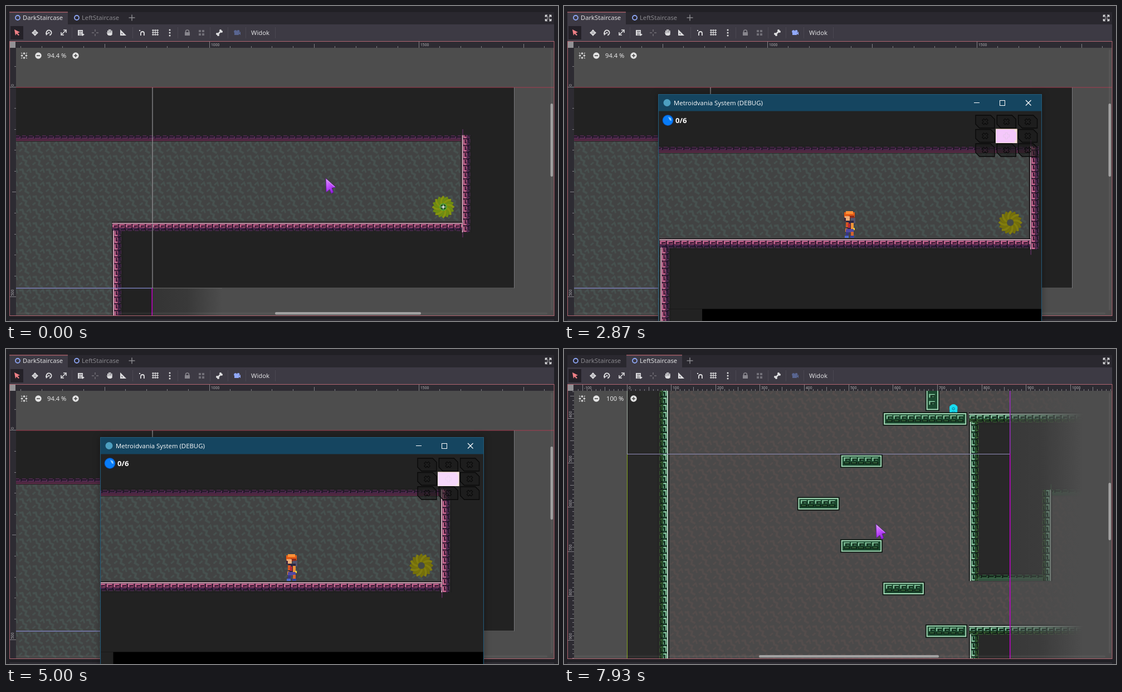
An HTML page with a canvas for the animation above (8000 ms loop, 991 px wide and 565 px high).

```html
<!DOCTYPE html>
<html lang="pl">
<head>
<meta charset="utf-8">
<title>Scene editor</title>
<style>
html, body { margin: 0; width: 100%; height: 100%; overflow: hidden; background: #212025; }
canvas { display: block; }
</style>
</head>
<body>
<canvas id="stage" width="991" height="565"></canvas>
<script>
const ctx = document.getElementById('stage').getContext('2d');
const LOOP = 8000, STEP = 200 / 3, UNIT = 0.7965;
const FONT = '"Noto Sans", "Open Sans", sans-serif';
const WIN = { x: 169, y: 158, w: 689, h: 418 };
const TAU = Math.PI * 2;

function rect(color, x, y, w, h, g = ctx) {
  g.fillStyle = color;
  g.fillRect(x, y, w, h);
}
function line(color, width, points, g = ctx) {
  g.strokeStyle = color;
  g.lineWidth = width;
  g.beginPath();
  points.forEach(([x, y], i) => i ? g.lineTo(x, y) : g.moveTo(x, y));
  g.stroke();
}
function poly(color, points) {
  ctx.fillStyle = color;
  ctx.beginPath();
  points.forEach(([x, y]) => ctx.lineTo(x, y));
  ctx.closePath();
  ctx.fill();
}
function disc(color, x, y, r) {
  ctx.fillStyle = color;
  ctx.beginPath();
  ctx.arc(x, y, r, 0, TAU);
  ctx.fill();
}
function ring(color, width, x, y, r) {
  ctx.strokeStyle = color;
  ctx.lineWidth = width;
  ctx.beginPath();
  ctx.arc(x, y, r, 0, TAU);
  ctx.stroke();
}
function text(str, x, y, size, color, weight = 400) {
  ctx.font = `${weight} ${size}px ${FONT}`;
  ctx.fillStyle = color;
  ctx.fillText(str, x, y);
}
function saved(draw) {
  ctx.save();
  draw();
  ctx.restore();
}
function clipTo(x, y, w, h) {
  ctx.beginPath();
  ctx.rect(x, y, w, h);
  ctx.clip();
}
// Linear interpolation between [time, ...values] keys.
function track(t, keys) {
  if (t <= keys[0][0]) return keys[0].slice(1);
  for (let i = 1; i < keys.length; i++) {
    const a = keys[i - 1], b = keys[i];
    if (t <= b[0]) {
      const k = (t - a[0]) / (b[0] - a[0]);
      return a.slice(1).map((v, j) => v + (b[j + 1] - v) * k);
    }
  }
  return keys[keys.length - 1].slice(1);
}
const ramp = (t, a, b) => Math.min(1, Math.max(0, (t - a) / (b - a)));

// ---- tile patterns, in world units ----
function makeTile(w, h, draw) {
  const c = document.createElement('canvas');
  c.width = w;
  c.height = h;
  draw(c.getContext('2d'));
  return { h, fill: ctx.createPattern(c, 'repeat') };
}
function stoneTile(base, blotch) {
  return makeTile(32, 32, g => {
    rect(base, 0, 0, 32, 32, g);
    for (const dx of [-32, 0, 32]) for (const dy of [-32, 0, 32]) {
      const shift = pts => pts.map(([x, y]) => [x + dx, y + dy]);
      line(blotch, 5, shift([[2, 5], [10, 4], [12, 13], [19, 16], [17, 24], [26, 29]]), g);
      line(blotch, 4, shift([[20, 9], [27, 3], [30, 12]]), g);
      line(blotch, 4, shift([[2, 25], [9, 19]]), g);
    }
  });
}
function brickTile(edge, hi, mid, lo, dark) {
  return makeTile(16, 25, g => {
    rect(dark, 0, 0, 16, 19, g);
    rect('#08080a', 0, 0, 16, 2, g);
    rect(edge, 0, 2, 16, 2.5, g);
    rect(mid, 1, 5, 14, 9, g);
    rect(hi, 1, 6, 12, 2, g);
    rect(hi, 1, 6, 2.5, 7, g);
    rect(hi, 8, 11.5, 5, 1.5, g);
    rect(dark, 5, 9, 8, 2.5, g);
    rect(lo, 0, 15, 13, 2, g);
    rect(lo, 2, 15, 2, 6, g);
    rect(lo, 6, 20, 9, 1.5, g);
    rect(dark, 8, 17, 6, 3, g);
  });
}
function dimTile(edge, lo, dark) {
  return makeTile(16, 17, g => {
    rect(dark, 0, 0, 16, 13, g);
    rect('#0a0a0c', 0, 0, 16, 1, g);
    rect(edge, 0, 1, 16, 1.4, g);
    rect(edge, 0, 4.5, 16, 1.2, g);
    rect(lo, 1, 7, 13, 1.8, g);
    rect(lo, 1, 7, 2, 5, g);
    rect(lo, 4, 12.5, 9, 1.4, g);
  });
}
const darkStone = stoneTile('#424343', '#47514f');
const leftStone = stoneTile('#4a4949', '#544d4c');
const pinkWall = brickTile('#e0b4c4', '#d4719b', '#7b3358', '#59305c', '#21152a');
const pinkDim = dimTile('#8a3c62', '#62305f', '#251a2b');
const greenWall = brickTile('#d2efdd', '#93d1ab', '#24573a', '#36602f', '#0f1f17');
const greenDim = dimTile('#66a67d', '#3a7048', '#14231a');

// Band that grows from its inner edge; the angle turns it to floor, wall or ceiling.
function wall(tile, x, y, len, quarter) {
  saved(() => {
    ctx.translate(x, y);
    ctx.rotate(quarter * Math.PI / 2);
    rect(tile.fill, 0, 0, len, tile.h);
  });
}
const FLOOR = 0, LEFT = 1, CEIL = 2, RIGHT = -1;

function portal(angle, editing) {
  saved(() => {
    ctx.translate(1558.5, 285.5);
    disc(editing ? '#66840f' : '#716d10cc', 0, 0, 23);
    ctx.rotate(angle);
    for (let i = 0; i < 16; i++) {
      ctx.rotate(TAU / 16);
      ctx.strokeStyle = i % 2 ? (editing ? '#86930f' : '#827d0d') : (editing ? '#6f8c12' : '#757009');
      ctx.lineWidth = 5;
      ctx.beginPath();
      ctx.moveTo(8, 0);
      ctx.quadraticCurveTo(18, 1, 22, 13);
      ctx.stroke();
    }
    ctx.rotate(-angle);
    disc(editing ? '#315b24' : '#454a46', 0, 0, 7.5);
    if (editing) {
      ring('#52b83e', 1.5, 0, 0, 8);
      line('#b7d8ce', 1.5, [[-6, 0], [6, 0]]);
      line('#b7d8ce', 1.5, [[0, -6], [0, 6]]);
      disc('#e6e6e6', 0, 0, 2.5);
    }
  });
}

function darkWorld(angle, editing) {
  rect('#222222', 0, 0, 1728, 480);
  rect('#222222', 0, 480, 864, 1000);
  rect(darkStone.fill, 0, 128, 1603, 194);
  rect(darkStone.fill, 0, 320, 769, 1000);
  wall(pinkDim, 1622, 129, 1622, CEIL);
  wall(pinkWall, 768, 1300, 979, RIGHT);
  wall(pinkWall, 1601, 346, 232, RIGHT);
  wall(pinkWall, 768, 321, 836, FLOOR);
  rect('#5a2e5b', 1604, 100, 2, 14);
  rect('#5a2e5b', 1604, 346, 2, 12);
  portal(angle, editing);
}

function platform(x, y, w, h) {
  rect('#07110b', x - 1, y - 1, w + 2, h + 2);
  rect('#a5dcb9', x + 1, y + 1, w - 2, h - 2);
  rect('#1c4a30', x + 3.5, y + 3.5, w - 7, h - 7);
  const tall = h > w, count = Math.floor((Math.max(w, h) - 8) / 16);
  for (let i = 0; i < count; i++) {
    const bx = x + 7 + (tall ? 0 : i * 16), by = y + 6 + (tall ? i * 16 : 0);
    rect('#8bcaa3', bx, by, 13, 2);
    rect('#8bcaa3', bx, by, 2.5, 8);
    rect('#0f2216', bx + 4, by + 3, 9, 5);
    rect('#4c8f67', bx + 6, by + 5, 6, 2);
    if (!tall) {
      rect('#0f2216', bx, by + 10, 14, 5);
      rect('#39703f', bx + 2, by + 11, 9, 2);
    }
  }
}

function pipe(x, y, r) {
  for (const [color, width] of [['#a83006', 9], ['#e63c02', 6.5]]) {
    ctx.strokeStyle = color;
    ctx.lineWidth = width;
    ctx.beginPath();
    ctx.moveTo(x, 98);
    ctx.arcTo(x, y, x + 60, y, r);
    ctx.lineTo(1050, y);
    ctx.stroke();
  }
}

function leftWorld() {
  const dark = '#282828', end = 1060;
  rect(dark, 0, 0, end, 1400);
  rect(leftStone.fill, 95, 97, end - 95, 1300);
  rect(dark, 674, 0, 284, 286);
  rect(dark, 958, 0, 110, 127);
  rect(dark, 771, 387, 187, 379);
  rect(dark, 958, 387, 110, 187);
  rect(dark, 771, 865, 300, 500);
  pipe(629, 324, 16);
  pipe(653, 302, 4);

  wall(greenDim, 695, 97, 620, CEIL);
  wall(greenWall, 95, 80, 1300, LEFT);
  wall(greenWall, 673, 286, 206, RIGHT);
  wall(greenDim, 958, 286, 284, CEIL);
  wall(greenWall, 958, 115, 171, LEFT);
  wall(greenDim, end, 127, 122, CEIL);
  wall(greenDim, 958, 766, 187, CEIL);
  wall(greenWall, 958, 560, 206, LEFT);
  wall(greenDim, end, 574, 102, CEIL);
  wall(greenWall, 771, 766, 379, RIGHT);
  wall(greenWall, 771, 387, 290, FLOOR);
  wall(greenWall, 771, 1400, 535, RIGHT);
  wall(greenWall, 771, 865, 290, FLOOR);
  for (const [x, y] of [[91, 68], [677, 68], [955, 101], [955, 548]]) rect('#315638', x, y, 2, 14);

  platform(674, 291, 29, 91);
  platform(578, 387, 188, 28);
  platform(674, 865, 92, 28);
  for (const [x, y] of [[482, 482], [385, 578], [482, 673], [577, 769]]) platform(x, y, 93, 28);

  rect('#0ba8bd', 727, 372, 18, 14);
  disc('#18dcf0', 736, 377, 9);
  rect('#18dcf0', 728, 377, 16, 9);
  ring('#0b90a8', 1.5, 736, 378, 2.5);
  line('#0b90a8', 1.5, [[732, 385], [740, 385]]);

  const fog = ctx.createLinearGradient(864, 0, 1028, 0);
  fog.addColorStop(0, 'rgba(77,77,77,.46)');
  fog.addColorStop(0.4, 'rgba(77,77,77,.52)');
  fog.addColorStop(1, 'rgba(77,77,77,1)');
  rect(fog, 864, 0, 210, 1400);
}

// ---- editor ----
const ICON = '#dedee0';
function arrows(x, y, r, color, width) {
  line(color, width, [[x - r + 2, y], [x + r - 2, y]]);
  line(color, width, [[x, y - r + 2], [x, y + r - 2]]);
  for (let i = 0; i < 4; i++) saved(() => {
    ctx.translate(x, y);
    ctx.rotate(i * Math.PI / 2);
    poly(color, [[r, 0], [r - 4, -3 - width / 4], [r - 4, 3 + width / 4]]);
  });
}

function toolbar(leftTab, running) {
  rect('#212025', 0, 0, 991, 565);
  rect('#2a282f', 6, 11, 978, 22);
  rect('#3d3a44', 6, 33, 978, 31);
  const tabX = leftTab ? 112 : 6, tabW = leftTab ? 100 : 105;
  rect('#3d3a44', tabX, 11, tabW, 22);
  rect('#bd6872', tabX, 10.5, tabW, 1.2);
  [['DarkStaircase', 6, !leftTab], ['LeftStaircase', 112, leftTab]].forEach(([name, x, on]) => {
    ring('#8da5f3', 1.8, x + 15, 21, 4);
    text(name, x + 24, 25, 11.2, on ? '#e0e0e2' : '#89888d');
  });
  line('#8f8e93', 1.4, [[220.5, 21], [231.5, 21]]);
  line('#8f8e93', 1.4, [[226, 15.5], [226, 26.5]]);
  for (const sx of [-1, 1]) for (const sy of [-1, 1]) {
    const x = 973.5 + sx * 5, y = 21.5 + sy * 5;
    line(ICON, 1.6, [[x - sx * 3.5, y], [x, y], [x, y - sy * 3.5]]);
    line(ICON, 1.3, [[x, y], [x - sx * 4, y - sy * 4]]);
  }

  for (const x of [118, 227, 308, 366, 398, 430, 483]) rect('#4a4751', x, 38, 1, 20);
  rect('#242128', 8, 36, 23, 24);
  poly('#f08086', [[15, 42], [25, 47], [21, 48.5], [24, 52], [22, 53], [19, 49.5], [17, 53]]);
  arrows(52, 48, 6, ICON, 1.5);
  ctx.strokeStyle = ICON;
  ctx.lineWidth = 2;
  ctx.beginPath();
  ctx.arc(77, 48, 4.5, 2.4, 7.6);
  ctx.stroke();
  poly(ICON, [[71, 48], [76, 49], [72, 53]]);
  disc(ICON, 77, 48, 1.5);
  line(ICON, 1.6, [[99, 47], [99, 52], [104, 52]]);
  line(ICON, 1.6, [[100, 51], [107, 44]]);
  line(ICON, 1.6, [[103, 43], [108, 43], [108, 48]]);
  rect(ICON, 129, 43, 9, 10);
  for (const y of [45, 48, 51]) rect('#3d3a44', 131, y, 6, 1);
  poly(ICON, [[135, 48], [141, 51], [137, 54]]);
  for (let i = 0; i < 4; i++) {
    const a = i * Math.PI / 2, c = Math.cos(a), s = Math.sin(a);
    line('#77757c', 1.4, [[160 + 2 * c, 48 + 2 * s], [160 + 6 * c, 48 + 6 * s]]);
  }
  for (let i = 0; i < 4; i++) rect(ICON, 182 + i * 2.3, i % 3 ? 42 : 44, 1.7, 8);
  poly(ICON, [[180, 47], [183, 49], [191, 47], [189, 53], [184, 53]]);
  poly(ICON, [[205, 42], [216, 53], [205, 53]]);
  poly('#3d3a44', [[207.5, 48], [210, 50.5], [207.5, 50.5]]);
  rect(ICON, 239, 43, 2, 2);
  ctx.strokeStyle = ICON;
  ctx.lineWidth = 1.8;
  ctx.beginPath();
  ctx.arc(245, 49, 3, Math.PI, 0);
  ctx.stroke();
  for (const x of [242, 248]) rect(ICON, x - 1, 49, 1.8, 4);
  for (const d of [0, 4, 8]) {
    line(ICON, 1.2, [[264 + d, 42], [264 + d, 53]]);
    line(ICON, 1.2, [[262, 43.5 + d], [274, 43.5 + d]]);
  }
  for (const y of [43, 48, 53]) disc(ICON, 294, y, 1.5);
  rect('#88868d', 321, 47, 9, 6);
  ring('#88868d', 1.6, 325.5, 46, 3);
  for (const [x, y] of [[346, 43], [352, 43], [346, 49], [352, 49]]) rect('#716f77', x, y, 4, 4);
  line(ICON, 2.6, [[380, 51], [386, 45]]);
  for (const [x, y] of [[379, 50], [381, 52], [385, 44], [387, 46]]) disc(ICON, x, y, 2);
  const cam = running ? '#91a9fa' : '#596590';
  disc(cam, 412, 46, 2.8);
  disc(cam, 417, 45.5, 2.4);
  rect(cam, 410, 46, 8, 6);
  poly(cam, [[417, 49], [421, 46], [421, 52]]);
  text('Widok', 440, 52, 11.2, '#dedee0');
}

function rulers(ox, oy, scale, major, minor) {
  rect('#2d2b32', 7, 64, 977, 11);
  rect('#2d2b32', 7, 64, 11, 491);
  const tick = v => v % major === 0 ? 11 : v % (major / 2) === 0 ? 7 : 3;
  saved(() => {
    clipTo(18, 64, 966, 11);
    for (let v = Math.floor(-ox / scale / major) * major; ox + v * scale < 984; v += minor) {
      const x = Math.floor(ox + v * scale), h = tick(v);
      rect('#838287', x, 75 - h, 1, h);
      if (h === 11) text(String(v), x + 3, 72, 6.7, '#b5b4b8');
    }
  });
  saved(() => {
    clipTo(7, 75, 11, 480);
    for (let v = Math.floor(-oy / scale / major) * major; oy + v * scale < 580; v += minor) {
      const y = Math.floor(oy + v * scale), w = tick(v);
      rect('#838287', 18 - w, y, w, 1);
      if (w === 11) saved(() => {
        ctx.translate(14, y - 1);
        ctx.rotate(-Math.PI / 2);
        text(String(v), 0, 0, 6.7, '#b5b4b8');
      });
    }
  });
  rect('#929195', 7, 64, 10, 11);
}

function zoomBar(label) {
  const c = '#e4e4e4';
  for (let i = 0; i < 4; i++) saved(() => {
    ctx.translate(32.5, 89);
    ctx.rotate(i * Math.PI / 2);
    poly(c, [[1.8, 0], [4.5, -2.6], [4.5, 2.6]]);
    line(c, 1.3, [[4, 0], [6, 0]]);
    line(c, 1.1, [[3.6, 3.6], [5.2, 5.2]]);
  });
  disc(c, 58, 89, 5.7);
  disc(c, 125, 89, 5.7);
  rect('#444', 55, 88.3, 6, 1.5);
  rect('#444', 122, 88.3, 6, 1.5);
  rect('#444', 124.3, 86, 1.5, 6);
  text(label, label.length > 5 ? 74 : 76, 93, 11.2, '#e6e6e6');
}

function scrollbars(hx, hw, vy, vh) {
  const bar = (color, x, y, w, h) => {
    ctx.fillStyle = color;
    ctx.beginPath();
    ctx.roundRect(x, y, w, h, 2);
    ctx.fill();
  };
  bar('#ffffff0c', 18, 549.5, 954, 3.5);
  bar('#ffffff0c', 978, 78, 3.5, 468);
  bar('#a1a1a1', hx, 549, hw, 4.5);
  bar('#a1a1a1', 977.5, vy, 4.5, vh);
}

function inWorld(x, y, scale, draw) {
  saved(() => {
    ctx.translate(x, y);
    ctx.scale(scale, scale);
    draw();
  });
}

function darkScene() {
  const ox = -387, oy = 145.8, s = 0.752;
  inWorld(ox, oy, s, () => darkWorld(0.3, true));
  const fade = ctx.createLinearGradient(263, 0, 388, 0);
  fade.addColorStop(0, '#343434');
  fade.addColorStop(0.5, '#393939');
  fade.addColorStop(1, '#4d4d4d');
  rect(fade, 263, 506, 125, 50);
  rect('#a73c50', 18, 145.5, 966, 1);
  rect('#77777b', 912, 146, 1, 360);
  rect('#737373', 263, 505.5, 650, 1);
  rect('#a9a9ae', 262.5, 146, 1, 360);
  rect('#898fd6', 18, 505.5, 245, 1.2);
  rect('#c400c8', 261.5, 506, 1.5, 50);
  zoomBar('94.4 %');
  scrollbars(483, 262, 175, 131);
  rulers(ox, oy, s, 500, 50);
}

function leftScene(ox, oy) {
  inWorld(ox, oy, UNIT, leftWorld);
  const left = Math.floor(ox), top = Math.floor(oy);
  const edge = Math.floor(ox + 864 * UNIT) - 1, mid = Math.floor(oy + 480 * UNIT);
  rect('#945060', 18, top, 966, 1);
  rect('#84a51e', left, 75, 1, 481);
  rect('#a3b0a5', left, top, 1, mid - top);
  rect('#9c2cc0', edge, top, 1.5, mid - top);
  rect('#c500ce', edge, mid, 1.5, 600);
  rect('#9490bd', left, mid, edge - left, 1);
  rect('#777', left, top, edge - left, 1);
  line('#fff', 1.5, [[ox - 5, oy + 0.5], [ox + 5, oy + 0.5]]);
  line('#fff', 1.5, [[ox + 0.5, oy - 5], [ox + 0.5, oy + 5]]);
  disc('#4d4d4d', ox + 0.5, oy + 0.5, 1.4);
  zoomBar('100 %');
  scrollbars(347 - (ox - 120) * 0.43, 323, 158 + (129 - oy) * 0.254, 103);
  rulers(ox, oy, UNIT, 100, 10);
}

function editor(t) {
  const left = t >= 6600;
  toolbar(left, t >= 800 && t < 5400);
  saved(() => {
    clipTo(7, 64, 977, 491);
    rect('#4d4d4d', 0, 0, 991, 565);
    if (left) leftScene(...track(t, VIEW));
    else darkScene();
  });
  ctx.strokeStyle = '#b26570';
  ctx.lineWidth = 1;
  ctx.strokeRect(6.5, 63.5, 977.5, 492);
  rect('#2d2b32', 6, 562, 978, 3);
}

function saveDialog(t) {
  rect('#302e35', 311, 341, 406, 82);
  rect('#3d3a44', 312, 342, 404, 80);
  text('Zapisywanie sceny', 462, 362, 11.2, '#e0e0e2');
  rect('#28262c', 320, 372, 388, 18);
  rect('#77757d', 320, 372, 388 * ramp(t, 760, 1020), 18);
}

// ---- running game ----
const STAND = [
  ['#e45c16', -10, -47, 19, 9], ['#ff9238', -7, -49, 13, 5], ['#8b2c1c', -2, -41, 10, 5],
  ['#edae7a', -9, -40, 9, 8], ['#40243a', -10, -37, 3, 6], ['#55536c', 2, -37, 8, 10],
  ['#2c2743', -6, -32, 13, 15], ['#d65422', -7, -29, 5, 9], ['#ee9338', 2, -28, 5, 11],
  ['#b42a38', -3, -27, 4, 8], ['#f3d23c', 6, -19, 3, 4], ['#e8812c', -8, -18, 4, 6],
  ['#5148a2', -7, -17, 14, 6], ['#383582', -7, -11, 5, 7], ['#d4632f', 2, -12, 5, 8],
  ['#4a68c9', -9, -5, 7, 4], ['#344399', 1, -5, 7, 4],
];
const LEAP = [
  ['#ed6416', -16, -41, 15, 7], ['#ff9a3e', -14, -42, 12, 4], ['#efb37e', -14, -35, 8, 6],
  ['#493f58', -2, -37, 10, 10], ['#332b4a', -10, -29, 16, 9], ['#d54c24', -11, -28, 7, 8],
  ['#e88a34', 4, -25, 7, 5], ['#f2c13c', 8, -21, 3, 4], ['#ba3144', -6, -22, 7, 7],
  ['#554ba7', -7, -17, 9, 7], ['#ea752c', -6, -12, 9, 6], ['#3e58bd', -14, -11, 6, 6],
  ['#4567d2', -6, -5, 8, 4],
];
function hero(pose, facing) {
  saved(() => {
    ctx.translate(513, 417);
    ctx.scale(-facing, 1);
    for (const part of pose) rect(...part);
  });
}

function minimap(glow) {
  for (let i = 0; i < 9; i++) {
    const x = 739 + (i % 3) * 38.3, y = 196 + Math.floor(i / 3) * 25.5;
    if (i === 4) {
      rect('#ecb868', 775, 220.5, 38.5, 25.5);
      rect('#e43cff', 776, 221.5, 36, 23.5);
      rect('#ecb868', 809, 221.5, 3, 4);
      rect('#ecb868', 809, 241, 3, 4);
    } else {
      ctx.beginPath();
      const c = 7, w = 34, h = 23;
      [[0, 0], [w - c, 0], [w, c], [w, h], [c, h], [0, h - c]].forEach(([a, b]) => ctx.lineTo(x + a, y + b));
      ctx.closePath();
      ctx.fillStyle = '#1a1a1a99';
      ctx.fill();
      ctx.strokeStyle = '#080808';
      ctx.lineWidth = 1.3;
      ctx.stroke();
    }
    saved(() => {
      ctx.translate(x + 17, y + 11.5);
      ctx.rotate(i === 4 ? 0 : Math.PI / 4);
      ctx.strokeStyle = i === 4 ? '#9630b0' : '#090909';
      ctx.lineWidth = 1;
      ctx.beginPath();
      const a = 2, b = 5.5;
      [[-a, -b], [a, -b], [a, -a], [b, -a], [b, a], [a, a], [a, b], [-a, b], [-a, a], [-b, a], [-b, -a], [-a, -a]]
        .forEach(p => ctx.lineTo(...p));
      ctx.closePath();
      ctx.stroke();
    });
  }
  rect(`rgba(250,238,250,${glow})`, 775, 220.5, 38.5, 25.5);
}

const RUN = [[2600, 1277], [3140, 1115.5], [3740, 1115.5], [4340, 1292], [4420, 1292], [4510, 1267]];
function game(t) {
  const [px] = track(t, RUN);
  const fall = Math.max(0, t - 2040) / 1000;
  const py = Math.min(278, 219 + 490 * fall * fall);
  const moving = Math.abs(px - track(t + 1, RUN)[0]) > 0.01;
  const facing = t < 2600 || (t >= 3740 && t < 4420) ? 1 : -1;
  const ox = 513.5 - px * UNIT, oy = 382.5 - py * UNIT;
  rect('#000', WIN.x, 188, WIN.w, 400);
  inWorld(ox, oy, UNIT, () => darkWorld(t / 320, false));
  const stride = moving && Math.floor(t / 133) % 2 === 0;
  hero(py < 278 || stride ? LEAP : STAND, facing);

  disc('#0a4ca8', 186.5, 205, 10);
  disc('#087cf8', 186.5, 205, 9);
  poly('#8ccaff', [[187, 199], [192, 201], [193, 206], [190, 205]]);
  text('0/6', 200, 210, 13.2, '#ffffff', 600);
  minimap(0.44 * (1 - Math.cos((t - 3470) / 1000 * TAU)));
}

function gameWindow(t) {
  const open = ramp(t, 1200, 1530), close = ramp(t, 5370, 5670);
  const scale = 0.86 + 0.14 * (1 - (1 - open) ** 2) - 0.2 * close;
  saved(() => {
    ctx.globalAlpha = open * (1 - close);
    ctx.translate(513.5, 367);
    ctx.scale(scale, scale);
    ctx.translate(-513.5, -367);
    saved(() => {
      ctx.shadowColor = 'rgba(0,0,0,.35)';
      ctx.shadowBlur = 12;
      rect('#242424', WIN.x, WIN.y, WIN.w, WIN.h);
    });
    clipTo(WIN.x, WIN.y, WIN.w, WIN.h);
    if (t >= 2130) game(t);
    else if (t >= 1865) disc('#478cbf', 514, 380, 107);
    rect('#154560', WIN.x, WIN.y, WIN.w, 30.5);
    disc('#4d9fc0', 185, 173.5, 6.5);
    ctx.font = '11.4px "Open Sans", "Noto Sans", sans-serif';
    ctx.fillStyle = '#fff';
    ctx.fillText('Metroidvania System (DEBUG)', 197, 178);
    rect('#fff', 736, 173, 10, 1);
    ctx.strokeStyle = '#fff';
    ctx.lineWidth = 1;
    ctx.strokeRect(782.5, 169.5, 9, 9);
    line('#fff', 1.2, [[829, 169], [838.5, 178.5]]);
    line('#fff', 1.2, [[838.5, 169], [829, 178.5]]);
    ctx.strokeStyle = '#245a78';
    ctx.strokeRect(WIN.x + 0.5, WIN.y + 0.5, WIN.w - 1, WIN.h);
  });
}

// ---- pointer ----
const VIEW = [[7200, 120, 129], [7400, 118, 0], [7467, 117, -30], [7600, 113, -120], [7800, 113, -120], [7933, 113, -194]];
const POINTER = [
  [5700, 574, 309], [6270, 163, 31], [6640, 163, 31], [7000, 427, 455], [7200, 427, 455],
  [7400, 425, 326], [7600, 562, 390], [7800, 562, 390], [7933, 560, 314],
];
function pointer(t) {
  if (t >= 2600 && t < 5400) return;
  const [x, y] = track(t, POINTER);
  if (t >= 7060 && t < 7910) {
    arrows(x, y, 11.5, '#111', 4.5);
    arrows(x, y, 10.5, '#fff', 2);
    return;
  }
  saved(() => {
    ctx.translate(x, y);
    const shade = ctx.createLinearGradient(0, 4, 14, 26);
    shade.addColorStop(0, '#d58cff');
    shade.addColorStop(0.45, '#c04dff');
    shade.addColorStop(1, '#8a19d6');
    const shape = [[0, 0], [18, 16], [11, 17.5], [14, 25], [10, 27.5], [7, 20], [1, 25]];
    poly(shade, shape);
    line('#5c138f', 0.8, [...shape, shape[0]]);
    line('#e8b5ff', 1, [[1, 2], [16, 15.5]]);
  });
}

function draw(now) {
  const t = Math.floor((now % LOOP + 4) / STEP) * STEP;
  editor(t);
  if (t >= 795 && t < 1060) saveDialog(t);
  if (t >= 1260 && t < 5670) gameWindow(t);
  pointer(t);
}

const start = performance.now();
function tick() {
  draw(performance.now() - start);
  requestAnimationFrame(tick);
}
tick();
</script>
</body>
</html>
```
